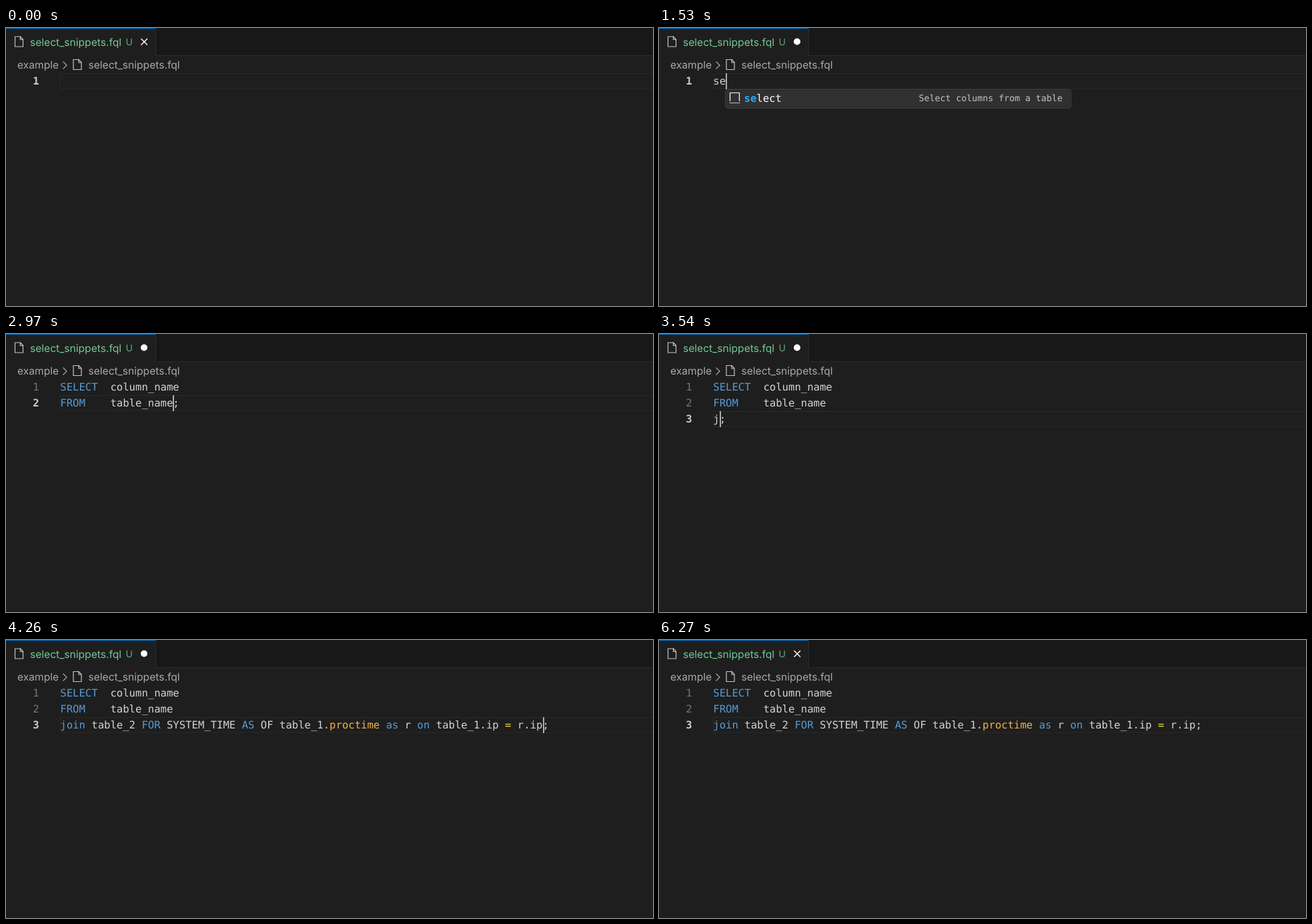
Write an HTML page with a canvas that moves like this. It is 970 by 418 pixels and loops after 6330 ms.

```html
<!DOCTYPE html>
<html lang="en">
<head>
<meta charset="utf-8">
<title>Snippet completion</title>
<style>
  html, body { margin: 0; width: 100%; height: 100%; overflow: hidden; background: #1e1e1e; }
  canvas { display: block; }
</style>
</head>
<body>
<canvas id="stage" width="970" height="418"></canvas>
<script>
const ctx = document.getElementById('stage').getContext('2d');
const LOOP = 6330;
const FONT = 15.6, ADVANCE = 0.602, CHAR = FONT * ADVANCE;
const LEFT = 81.3, TOP = 68, ROW = 24;
const UI = 'Inter, sans-serif';
const MONO = '"DejaVu Sans Mono", monospace';
const TEXT = '#d4d4d4', KEYWORD = '#569cd6', GREEN = '#73c991', MUTED = '#a9a9a9';

const COLORS = {
  SELECT: KEYWORD, FROM: KEYWORD, join: KEYWORD, FOR: KEYWORD, AS: KEYWORD,
  as: KEYWORD, on: KEYWORD, proctime: '#f2b14f', '=': '#f5e62a'
};
const SELECT = 'SELECT  column_name';
const FROM = 'FROM    table_name';
const JOIN = 'join table_2 FOR SYSTEM_TIME AS OF table_1.proctime as r on table_1.ip = r.ip;';
const suggest = (label, detail, typed) => ({ label, detail, typed });
const selectItem = n => suggest('select', 'Select columns from a table', n);
const joinItem = n => suggest('join', 'Join', n);

// Each step overrides parts of the state before it.
const steps = [
  { at: 0, lines: [''], row: 0, col: 0, caret: false, colored: false, popup: null, dirty: false, placeholders: false },
  { at: 540, caret: true },
  { at: 960, lines: ['s'], col: 1, popup: selectItem(1), dirty: true },
  { at: 1410, caret: false },
  { at: 1530, lines: ['se'], col: 2, caret: true, popup: selectItem(2) },
  { at: 1980, caret: false },
  { at: 2070, lines: [SELECT, FROM + ';'], col: 19, caret: true, popup: null, placeholders: true },
  { at: 2100, colored: true },
  { at: 2520, caret: false },
  { at: 2610, row: 1, caret: true, placeholders: false },
  { at: 2970, col: 18 },
  { at: 3210, lines: [SELECT, FROM, ';'], row: 2, col: 0 },
  { at: 3540, lines: [SELECT, FROM, 'j;'], col: 1 },
  { at: 3570, popup: joinItem(1) },
  { at: 3720, lines: [SELECT, FROM, 'jo;'], col: 2, popup: joinItem(2) },
  { at: 3840, lines: [SELECT, FROM, 'joi;'], col: 3, popup: joinItem(3) },
  { at: 4260, lines: [SELECT, FROM, JOIN], col: 77, popup: null },
  { at: 4710, caret: false },
  { at: 4920, col: 78, caret: true },
  { at: 5310, dirty: false },
  { at: 5340, caret: false },
  { at: 5820, caret: true },
  { at: 6270, caret: false }
];

const stateAt = time => Object.assign({}, ...steps.filter(step => step.at <= time));

function rect(x, y, w, h, color) {
  ctx.fillStyle = color;
  ctx.fillRect(x, y, w, h);
}

function path(points, color, width) {
  ctx.beginPath();
  points.forEach(([x, y]) => ctx.lineTo(x, y));
  ctx.strokeStyle = color;
  ctx.lineWidth = width;
  ctx.stroke();
}

function label(text, x, y, color, size = FONT) {
  ctx.font = `${size}px ${UI}`;
  ctx.fillStyle = color;
  ctx.fillText(text, x, y);
}

function mono(text, x, y, color, size = FONT, weight = 'normal') {
  ctx.font = `${weight} ${size}px ${MONO}`;
  ctx.fillStyle = color;
  [...text].forEach((char, i) => ctx.fillText(char, x + i * size * ADVANCE, y));
}

function fileIcon(x, y) {
  path([[x + 8, y], [x, y], [x, y + 15], [x + 12, y + 15], [x + 12, y + 4],
        [x + 8, y], [x + 8, y + 4.5], [x + 12, y + 4.5]], '#c5c5c5', 1.2);
}

function drawHeader(dirty) {
  rect(225, 0, 745, 41, '#181818');
  rect(224, 0, 1, 42, '#2b2b2b');
  rect(224, 41, 746, 1, '#2b2b2b');
  rect(0, 0, 224, 1, '#0078d4');
  fileIcon(13.5, 13);
  label('select_snippets.fql', 36, 27, GREEN);
  label('U', 179.5, 26, '#62a97c', 14);
  if (dirty) {
    ctx.beginPath();
    ctx.arc(207, 20.5, 5, 0, Math.PI * 2);
    ctx.fillStyle = '#ffffff';
    ctx.fill();
  } else {
    path([[202.5, 16], [212, 25.5]], '#ffffff', 1.4);
    path([[212, 16], [202.5, 25.5]], '#ffffff', 1.4);
  }
  label('example', 17, 61, MUTED);
  path([[85.5, 50.5], [91, 56], [85.5, 61.5]], MUTED, 1.2);
  fileIcon(101, 47.5);
  label('select_snippets.fql', 123.5, 61, MUTED);
}

function drawCode(text, y, colored) {
  let col = 0;
  for (const token of text.split(/([ .;]+)/)) {
    mono(token, LEFT + col * CHAR, y, colored && COLORS[token] || TEXT);
    col += token.length;
  }
}

function drawPopup({ label: name, detail, typed }, row, col) {
  const x = Math.floor(80.6 + col * CHAR), y = TOP + (row + 1) * ROW;
  const width = 519, height = 29;
  ctx.beginPath();
  ctx.roundRect(x + 0.5, y + 0.5, width - 1, height - 1, 3);
  ctx.fillStyle = '#252526';
  ctx.fill();
  rect(x + 2, y + 2, width - 4, height - 4, '#303031');
  ctx.strokeStyle = '#454545';
  ctx.lineWidth = 1;
  ctx.stroke();

  path([[x + 7.5, y + 18], [x + 7.5, y + 5.5], [x + 21.5, y + 5.5], [x + 21.5, y + 18]], '#ffffff', 1.2);
  for (let i = 0; i < 8; i++) rect(x + 7 + i * 2, y + 20, 1.2, 1.2, '#ffffff');

  const textX = x + 28.5;
  mono(name.slice(0, typed), textX, y + 19, '#2aaaff', FONT, 'bold');
  mono(name.slice(typed), textX + typed * CHAR, y + 19, '#ffffff');
  const small = 13.26;
  mono(detail, x + width - 13 - detail.length * small * ADVANCE, y + 18, '#c4c4c4', small);
}

function draw(time) {
  const s = stateAt(time);
  const caretX = Math.round(81.4 + s.col * CHAR), caretY = TOP + s.row * ROW;
  rect(0, 0, 970, 418, '#1e1e1e');
  drawHeader(s.dirty);

  if (s.placeholders) {
    rect(157, TOP, 103, ROW, '#405c79');
    rect(157, TOP + ROW, 93, ROW, '#3a3a3a');
    rect(259, TOP + ROW, 2, ROW, '#525252');
  } else {
    ctx.strokeStyle = '#2a2a2a';
    ctx.lineWidth = 1;
    ctx.strokeRect(81.5, caretY + 0.5, 900, 22.5);
  }

  s.lines.forEach((line, i) => {
    const y = TOP + i * ROW + 17, active = i === s.row;
    mono(String(i + 1), 40.3, y, active ? '#cccccc' : '#6e7681', FONT, active ? 'bold' : 'normal');
    drawCode(line, y, s.colored);
  });
  if (s.caret) rect(caretX, caretY, 2, ROW, '#aeafad');
  if (s.popup) drawPopup(s.popup, s.row, s.col);
}

ctx.textRendering = 'geometricPrecision';
const start = performance.now();
function tick() {
  draw((performance.now() - start) % LOOP);
  requestAnimationFrame(tick);
}
tick();
</script>
</body>
</html>
```
